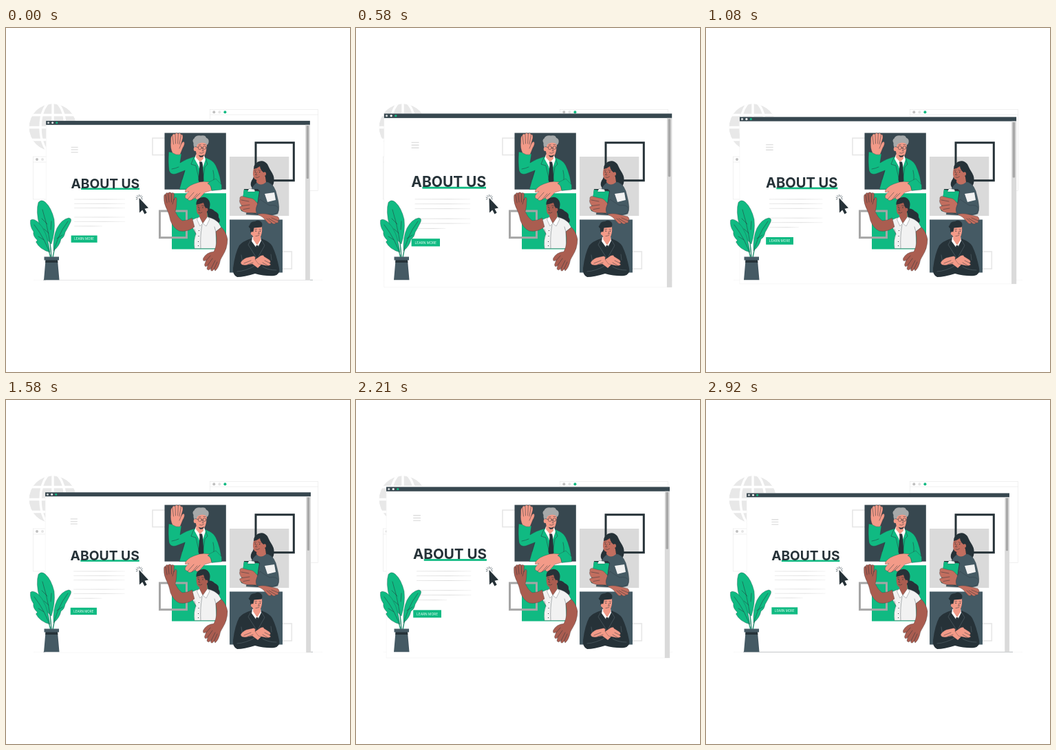
Recreate the animation shown at these times as an HTML page. Size 500 px wide and 500 px high, loop 2960 ms.

```html
<!DOCTYPE html>
<html lang="en">
<head>
<meta charset="utf-8">
<title>About us</title>
<style>
  html, body { margin: 0; width: 100%; height: 100%; overflow: hidden; background: #fff; }
  svg { display: block; width: 100vw; height: 100vh; }
  text { font-family: Inter, "Open Sans", sans-serif; }
  .ink { fill: #263238; }
  .slate { fill: #37474f; }
  .steel { fill: #455a64; }
  .green { fill: #10ba82; }
  .white { fill: #fff; }
  .rose { fill: #f39a88; }
  .brown { fill: #aa5d50; }
  .tan { fill: #c26e5f; }
  .line { fill: none; stroke: #263238; stroke-width: .5; stroke-linecap: round; stroke-linejoin: round; }
  .frame { fill: none; stroke: #e6e6e6; stroke-width: 1.6; }
  .edged { stroke: #263238; stroke-width: .3; stroke-linejoin: round; }
  .pane { fill: #fff; stroke: #e6e6e6; stroke-width: .6; }
</style>
</head>
<body>
<svg viewBox="0 0 500 500">
  <defs>
    <clipPath id="globeClip"><circle cx="68" cy="144.500" r="34.500"/></clipPath>
    <linearGradient id="rule">
      <stop offset="0" stop-color="#e6e6e6"/>
      <stop offset=".6" stop-color="#d8d8d8"/>
      <stop offset="1" stop-color="#d8d8d8" stop-opacity=".35"/>
    </linearGradient>
  </defs>
  <rect width="500" height="500" fill="#fff"/>

  <!-- globe -->
  <g clip-path="url(#globeClip)">
    <circle cx="68" cy="144.500" r="34.500" fill="#e8e8e8"/>
    <g fill="none" stroke="#fff" stroke-width="3.400">
      <path d="M68 108V182M32 144.500H104M36 126.500H100M36 162.500H100"/>
      <ellipse cx="68" cy="144.500" rx="18" ry="38"/>
    </g>
  </g>

  <!-- rear windows -->
  <rect class="pane" x="39.500" y="187" width="100" height="62"/>
  <path class="pane" d="M39.500 195H140"/>
  <circle cx="45" cy="191" r="2" fill="#c0c0c0"/>
  <circle cx="53" cy="191" r="2" fill="#e4e4e4"/>
  <rect class="pane" x="296.500" y="118.300" width="157" height="118"/>
  <path class="pane" d="M296.500 126H453.500"/>
  <circle cx="302.300" cy="122.200" r="2" fill="#c0c0c0"/>
  <circle cx="310.400" cy="122.200" r="2" fill="#e4e4e4"/>
  <circle class="green" cx="318.400" cy="122.200" r="2"/>

  <path d="M40 366.300H460" stroke="#f2f2f2" stroke-width=".6"/>
  <path d="M54 366.300H446" stroke="#8a9296" stroke-width=".6"/>

  <!-- pulsing window -->
  <g id="page">
    <rect x="58" y="134.800" width="384" height="231.700" fill="#fff" stroke="#efefef" stroke-width=".5"/>
    <rect class="slate" x="58" y="134.800" width="384" height="5.900"/>
    <circle cx="61.400" cy="137.700" r="1.500" fill="#cfd3d5"/>
    <circle class="white" cx="67.500" cy="137.700" r="1.500"/>
    <circle class="green" cx="73.600" cy="137.700" r="1.500"/>
    <rect x="435.300" y="140.700" width="6.700" height="225.800" fill="#dadada"/>
    <rect x="436.900" y="142" width="3.300" height="77" rx="1" fill="#a8a8a8"/>
    <path d="M94.500 173.300H104.500M94.500 176.900H104.500M94.500 180.500H104.500" stroke="#dedede" stroke-width="1.300"/>
    <rect class="green" x="109" y="232.400" width="85" height="2.600"/>
    <text class="ink" x="94.300" y="232.700" font-size="19.200" font-weight="700">ABOUT US</text>
    <g id="copy" fill="url(#rule)"></g>
    <rect class="green" x="94.500" y="301.600" width="38" height="10.300"/>
    <text x="113.500" y="308.500" text-anchor="middle" font-size="4.500" fill="#e9fff6">LEARN MORE</text>
  </g>

  <!-- panels -->
  <rect class="frame" x="213" y="160" width="25" height="24.500"/>
  <rect class="frame" x="390" y="325" width="25.300" height="25"/>
  <rect class="slate" x="230.500" y="152.500" width="89.300" height="82.200"/>
  <rect class="green" x="241" y="240.200" width="79" height="81.300"/>
  <rect x="325" y="187" width="86.300" height="86" fill="#dadada"/>
  <rect class="steel" x="325" y="278.500" width="77" height="77"/>
  <rect class="frame" x="223.500" y="266" width="39" height="38.700" style="stroke:#a6a6a6;stroke-width:3"/>
  <rect class="frame" x="363" y="166.700" width="55.300" height="55" style="stroke:#263238;stroke-width:3"/>

  <!-- man in green -->
  <g>
    <path class="green edged" d="M236.500 180Q235.500 196 237 207Q239 214 247 212L260 207Q256 220 252 234.700H313.500Q312 214 305 200Q302 194 296 191L287 187L274 187Q262 190 253 196L255 183Z"/>
    <path class="rose edged" d="M242 181.500Q238.500 175 239.500 165Q239 157 241.500 156.500Q243 152.500 245.500 154.500Q248 151 250 154Q253 151 254.300 155Q257.500 154 257 160L254.500 169Q257 164 259 165.500Q260.500 169 257 174L253 184Q247 185 242 181.500Z"/>
    <path class="line" d="M242 157L243.500 169M246 155L246.500 168M250.300 154L249.700 168M254.300 156L252 169M254.500 169L252 175"/>
    <path class="white" d="M276 184L274 190L280 201L283 211L287 200L290 191L288 185Z"/>
    <path class="rose" d="M277 178L276 188L282 195L287 190V180Z"/>
    <path class="ink" d="M281 194.500H285L286 199L287.500 222L283 229L279.500 221L281.500 199Z"/>
    <path class="rose" d="M274.500 165Q274 178 278 184Q283 190 288 186Q292 181 292 165Q283 159 274.500 165Z"/>
    <path d="M275.500 176Q272 173 272.500 167Q270 163 273.500 160.500Q276 155.500 283 156.500Q290 155 291 159.500Q297 162 293.500 169L292 170Q289 166 283 167Q278 168 277.500 171Z" fill="#a6a9aa"/>
    <ellipse class="rose" cx="275" cy="176" rx="2.300" ry="2.900"/>
    <g class="line" stroke-width=".4"><circle cx="281.800" cy="174" r="2.600"/><circle cx="288.600" cy="174" r="2.400"/><path d="M279.200 173.500L275 172.500M284.400 174H286.200M285.300 175L287 178.500H285M281.500 181.500Q284 183.500 287.500 180.500M280 170L283 169.500M287 169.500H290"/></g>
    <path class="ink" d="M279.500 184.500Q284 187 288 184Q286 189 282 187.500Z"/>
    <path class="line" d="M273 188L269 198L276 200L282 227M290 190L293 198L289 202L285 229M260 207L256 220M301 207Q304 221 300 226M241 205Q247 204 251 202"/>
    <path class="rose edged" d="M296 224Q284 222 278 225Q267 228 262 234Q259 237 261 239L266 237.500Q259 243 260.500 247L264 249Q266 252 270 250L275 247Q277 251 281 248L289 239L299 236Z"/>
    <path class="line" d="M264 249L273 239M270 250L278 241M275 247L282 240"/>
    <path class="green edged" d="M297 223L305 219L313.500 228V235L299 236.500Q299 229 293 226Z"/>
  </g>

  <!-- woman in white -->
  <g>
    <path class="ink" d="M292 263Q299 261 303 266Q310 269 309 275Q313 281 308 285Q301 288 297 282Q292 273 292 263Z"/>
    <path d="M270 279Q276 276 281 275H294Q303 277 309 283L313 290L305 296L306 320.500H274Q272 309 276 299L271 290Z" fill="#f2f2f2" class="edged"/>
    <path class="brown edged" d="M234 264Q229 255 229.500 246Q229.500 241 232 242Q232.500 238.500 235.500 240Q238 237.500 240.500 240Q244 238.500 244.500 242L244 250L246 246Q249 246 248 252Q248 261 246 267Q250 276 256 280Q264 280 270.500 276L274 289Q264 297 252 295Q243 291 239 280Q237 270 234 264Z"/>
    <path class="line" d="M232 242L234 254M235.700 241L237 253M240.500 241L240.500 253M244 249L242 256"/>
    <path class="brown" d="M281 268V276L286 284L293 276L292 266Z"/>
    <path class="brown" d="M277 254Q276 266 278.500 270Q283 275.500 288 271.500Q294 267 294 257Q285 246 277 254Z"/>
    <path class="ink" d="M276.500 257Q276 250 281 247.500Q288 244 293 248Q298 253 296 261Q295 267 292.500 269L291.500 264Q288 259 287 254Q281 256 276.500 257Z"/>
    <ellipse class="brown" cx="291.500" cy="264" rx="2" ry="2.600"/>
    <path class="line" d="M278 258.500L280.500 258M284.500 258L288 258.500M281.500 261L280 265H282M280 268.500Q282.500 270 285 268"/>
    <circle class="ink" cx="279.600" cy="260.700" r=".7"/><circle class="ink" cx="286" cy="261" r=".7"/>
    <path class="white edged" d="M281 274L286 284L282 288L277.500 278ZM293 274L286 284L291 288L296 278Z"/>
    <path class="line" d="M285 286Q282 302 283 320M276 300L274 292M305 296L303 289" style="stroke-width:.35"/>
    <path class="ink" d="M280 294h1v1h-1zM279.500 302h1v1h-1zM279 310h1v1h-1zM279 316h1v1h-1z"/>
    <path class="brown edged" d="M305 296L313 289.500Q320 296 322 307Q322 320 315 331Q311 337 310.500 342Q308 350 304 353L302.500 350Q300 355 297.500 352L298 349Q294 354 292 350L293 345Q289 349 288.500 344L291 337Q286 341 286.500 335Q291 326 302 325Q308 315 305 296Z"/>
    <path class="line" d="M291 338L297 331M293 345L300 335M298 350L304 338M302.500 350L307 340"/>
  </g>

  <!-- woman with clipboard -->
  <g>
    <path class="ink" d="M365 195Q374 190.500 380 198Q383 205 387 211Q391 218 389 226Q386 235 376 232Q366 238 358 233Q354 228 357 222Q361 217 361 207Z"/>
    <path class="steel edged" d="M357 234Q360 226 368 223L381 224Q391 228 394 244Q399 262 395 270Q389 273 365 272L349 271L353 256Z"/>
    <path class="tan" d="M365 213L364 224Q370 231 378 224L376 210Z"/>
    <path class="tan" d="M360 204Q357.500 214 361 219Q367 224 373 218Q379 213 378 205Q369 197 360 204Z"/>
    <path class="ink" d="M360 205Q359.500 196.500 368 195Q378 194 381 207L379 218Q375 216 376 211Q370 208 369 201Q365 204 360 205Z"/>
    <ellipse class="tan" cx="376" cy="212" rx="2" ry="2.800"/>
    <path class="line" d="M360.500 207L363.500 206.500M367 206.500L370 207.500M364.500 210L362.500 213.500H365M363 217Q366 218.500 368.500 216"/>
    <circle class="ink" cx="362.300" cy="209.300" r=".7"/><circle class="ink" cx="368.700" cy="209.500" r=".7"/>
    <path d="M376 241L390 239L392 250L380 253Z" fill="#f2f2f2"/>
    <path class="ink" d="M346 234H366L369 237L363 270L342 266Z"/>
    <path class="green" d="M346 235L368 237.500L363 269L341 265Z"/>
    <path class="white edged" d="M353 233.500L361 234.500L362 238H351Z"/>
    <path class="tan edged" d="M340 249Q339 245 343 244.500L353 247Q359 247 362 251L369 259L366 269L350 268.500Q340 266 339.500 260L343 258.500Q338 253 340 249Z"/>
    <path class="line" d="M342 250L353 252M343 258.500L354 257M345 263.500L354 262"/>
    <path class="steel edged" d="M369 249L383 258Q393 256 396 262Q397 269 388 271L365 270Q360 264 369 249Z"/>
    <path class="tan edged" d="M365 270.500Q374 269 382 271L395 274Q399 278 395.500 280Q397 284 392.500 283Q390 287 386 283Q383 287 379.500 282L373 275Z"/>
    <path class="line" d="M395.500 280L386 276M392 283L382 277M386 283L379 277"/>
  </g>

  <!-- man with crossed arms -->
  <g>
    <path class="ink" d="M356 306Q344 310 339 316Q333 327 330 349Q329 359 336 362Q346 362 362 357Q377 361 390 360Q399 358 397 349Q393 329 387 317Q384 311 371 306Z"/>
    <path class="white" d="M358 304L357 310L365 321L371 309L370 303Z"/>
    <path class="rose" d="M360 298L359 307L365 316L370 308V299Z"/>
    <path class="ink" d="M363.500 316H366.500L368 326L365 333L362 326Z"/>
    <path class="rose" d="M357.500 290Q356 300 360 305Q365 309 369 305Q373 299 372 289Q365 284 357.500 290Z"/>
    <path class="ink" d="M358 300Q354 297 355 291.500Q351 288 354 287Q355 281 362 281Q366 278 370 281Q374 284 371.500 289.500Q366 290 360.500 290.500Q360 295 358 300Z"/>
    <ellipse class="rose" cx="357.800" cy="298.500" rx="1.900" ry="2.600"/>
    <path class="line" d="M361.500 293L364.500 292.500M368 292.500L370.500 293M367 296L368.300 299H366.300M363 302.500Q366 302.500 368 301"/>
    <circle class="ink" cx="363.200" cy="295.300" r=".7"/><circle class="ink" cx="369.300" cy="295.300" r=".7"/>
    <path class="line" d="M356 308L352 315L364 334M371 308L376 316L367 332M342 330L344 342M385 329L386 337M336 354Q349 353 361 346M393 352Q381 352 373 347" style="stroke:#607078"/>
    <path class="rose edged" d="M341 341Q343 337 349 334L360 331.500Q364 333 362 336L371 344L366 349L358 343L350 344.500Q342 346 341 341Z"/>
    <path class="rose edged" d="M362 336.500L370 331Q375 329 375 332L383 337Q386 340 383 341.500L385 344Q382 346.500 376 345L367 343Z"/>
    <path class="line" d="M346 342L356 338M351 344L359 341M376 338L383 341.500M373 341L380 345"/>
  </g>

  <!-- pointer -->
  <path class="ink" d="M193.500 247L194 268.500L198.300 264.500L201.400 270.500L204.700 268.500L201.500 262.700L207 261.500Z"/>
  <g id="burst" stroke="#37474f" stroke-width=".7" stroke-linecap="round"></g>

  <!-- plant -->
  <g>
    <path d="M66 335Q65 312 60 290M65 335Q60 312 50 296M68 335Q71 310 84 288" fill="none" stroke="#10ba82" stroke-width="1.200"/>
    <path class="green edged" d="M66 314Q54 304 48.500 287Q43 266 47 253.500Q51 248.500 57 253Q66 261 70 278Q72 295 66 314Z"/>
    <path class="green edged" d="M64 326Q49 322 43.500 311L45.500 308.500Q38.500 302 40 296Q34.500 289 35.500 279.500Q39 276 46 281.500Q60 294 64 326Z"/>
    <path class="green edged" d="M69 324Q68 304 74 291Q81 278 91 276Q97 276.500 93 284Q89 292 86 297Q85 304 80 307Q78 317 69 324Z"/>
    <path class="line" d="M66 332Q64 300 53 264M65 332Q58 308 41 286M68 332Q73 303 90 281M62 298L55 292M65 293L66 281M60 285L52 277M55 308L47 303M74 306L82 301"/>
    <path class="steel" d="M55.500 332.500H77V337.500H75L77.500 366.300H55L57.500 337.500H55.500Z"/>
    <path class="ink" d="M57.500 337.500H75L75.300 341H57.200Z"/>
  </g>
</svg>
<script>
  const LOOP = 2960;
  const REST = 192;               // half width the window is drawn at
  const CENTER = { x: 250, y: 250.6 };
  // [time in ms, half width of the window]
  const PULSE = [[0, 191.8], [530, 210], [1700, 191], [2325, 209.3], [2925, 190.8], [LOOP, 191.8]];

  const page = document.getElementById('page');

  function add(parent, tag, attrs) {
    const node = document.createElementNS('http://www.w3.org/2000/svg', tag);
    for (const key in attrs) node.setAttribute(key, attrs[key]);
    document.getElementById(parent).append(node);
  }

  for (const [y, width] of [[249, 74], [255.3, 74], [261.7, 74], [275, 74], [281.3, 74], [288, 41]])
    add('copy', 'rect', { x: 99, y: y - .4, width, height: .8 });

  for (let i = 0; i < 7; i++) {
    const angle = Math.PI * (.88 + i * .2);
    const at = r => [193.8 + r * Math.cos(angle), 247.3 + r * Math.sin(angle)];
    const [x1, y1] = at(2.8), [x2, y2] = at(4.8);
    add('burst', 'line', { x1, y1, x2, y2 });
  }

  function halfWidth(t) {
    const i = PULSE.findIndex(([time]) => time > t);
    const [t0, w0] = PULSE[i - 1], [t1, w1] = PULSE[i];
    return w0 + (w1 - w0) * (t - t0) / (t1 - t0);
  }

  function draw(t) {
    const { x, y } = CENTER;
    const scale = halfWidth(t) / REST;
    page.setAttribute('transform', `translate(${x} ${y}) scale(${scale}) translate(${-x} ${-y})`);
  }

  const start = performance.now();
  function tick() {
    draw((performance.now() - start) % LOOP);
    requestAnimationFrame(tick);
  }
  tick();
</script>
</body>
</html>
```
